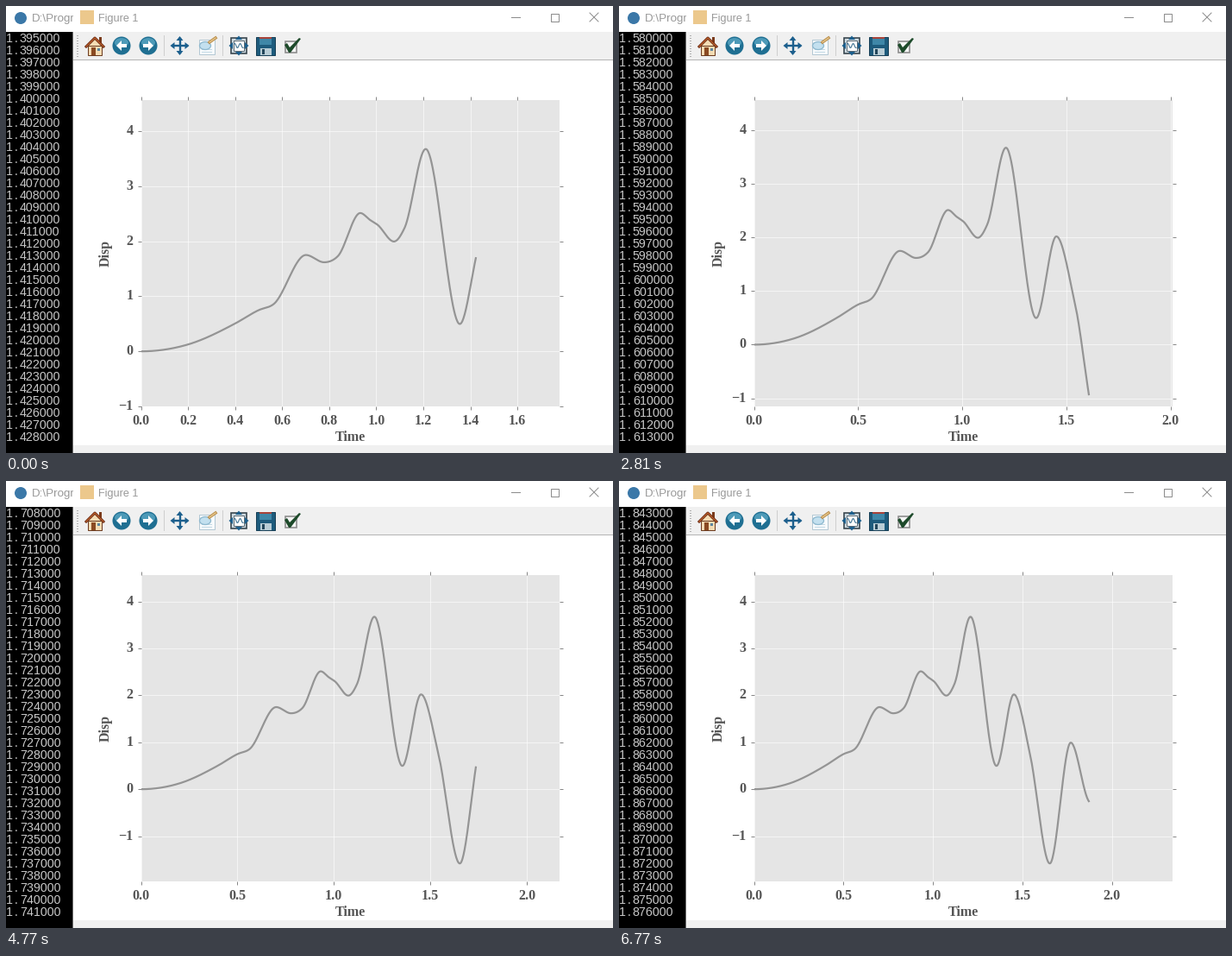
A matplotlib script that plays this animation: 704 by 518 pixels, repeating every 6.85 s.

```python
import numpy as np
import matplotlib.pyplot as plt
from matplotlib.animation import FuncAnimation
from matplotlib.patches import Circle, Ellipse, Polygon, Rectangle
from matplotlib.ticker import MaxNLocator

W, H, DPI = 704, 518, 72          # at 72 dpi one point is one pixel
FRAMES, INTERVAL = 137, 50
STEP_MS, LAST_STEP = 69.8, 97     # the simulated program redraws every ~70 ms
ROWS, ROW_H = 34, 14
MARGIN = 1.242                    # y limits relative to the curve's extremes

plt.rcParams.update({
    "font.family": "Liberation Serif", "font.weight": "bold", "font.size": 16,
    "ytick.alignment": "center",
})

# Peaks, valleys and bends of the displacement curve
KEYS = np.array([
    (0, 0), (.2, .125), (.4, .505), (.5, .748), (.563, .855), (.701, 1.75),
    (.778, 1.618), (.837, 1.73), (.932, 2.512), (.974, 2.385), (1.005, 2.3),
    (1.075, 1.995), (1.12, 2.24), (1.21, 3.675), (1.355, .497), (1.452, 2.02),
    (1.542, .755), (1.653, -1.582), (1.77, .993), (1.88, -.28),
])


def smooth_curve(keys):
    """Cubic Hermite curve that is level at each end, peak and valley."""
    x, y = keys.T
    d = np.diff(y, prepend=y[0], append=y[-1])
    m = np.where(d[:-1] * d[1:] > 0, np.gradient(y, x), 0)

    def f(t):
        i = np.clip(np.searchsorted(x, t) - 1, 0, len(x) - 2)
        h = x[i + 1] - x[i]
        u = (t - x[i]) / h
        s = u * u * (3 - 2 * u)
        return (y[i] * (1 - s) + y[i + 1] * s
                + h * u * (1 - u) * (m[i] * (1 - u) - m[i + 1] * u))
    return f


disp = smooth_curve(KEYS)
fig = plt.figure(figsize=(W / DPI, H / DPI), dpi=DPI, facecolor="white")


def layer():
    ax = fig.add_axes([0, 0, 1, 1])
    ax.set(xlim=(0, W), ylim=(H, 0))
    ax.axis("off")
    return ax


def rect(ax, x0, y0, x1, y1, color, **kw):
    ax.add_patch(Rectangle((x0, y0), x1 - x0, y1 - y0, fc=color,
                           **{"lw": 0, **kw}))


def poly(ax, pts, color):
    ax.add_patch(Polygon(pts, closed=True, fc=color, lw=0))


def stroke(ax, xs, ys, color, lw=1):
    ax.plot(xs, ys, color=color, lw=lw)


def label(ax, x, y, text, size, color, **kw):
    opts = {"family": "Liberation Sans", "weight": "normal",
            "va": "baseline", **kw}
    return ax.text(x, y, text, size=size, color=color, **opts)


# Console behind the figure window
con = layer()
rect(con, 0, 0, 78, 30, "white")
rect(con, 0, 30, 77, H, "black")
rect(con, 77, 30, 78, H, "#6e6e6e")
con.add_patch(Circle((17, 14), 7, fc="#3b78a8", lw=0))
label(con, 30, 18, r"D:\Progr", 13.4, "#999999")

rows = [[label(con, x, 42 + r * ROW_H, "", 14.2, "#c8c8c8")
         for x in (0, 9.5, 15.8)] for r in range(ROWS)]

# Figure window
win = layer()
rect(win, 78, 0, W, H, "white")
rect(win, 78, 30, W, 62, "#f0f0f0")
rect(win, 78, 62, W, 63, "#b4b4b4")
rect(win, 78, 509, W, H, "#f0f0f0")
rect(win, 86, 5, 102, 21, "#ecc88c")
label(win, 107, 18, "Figure 1", 12.6, "#999999")

GRAY = "#8c8c8c"
rect(win, 586, 13, 597, 14, GRAY)
rect(win, 631.5, 8.5, 640.5, 17.5, "none", ec=GRAY, lw=1)
stroke(win, [677, 687], [8, 18], GRAY)
stroke(win, [677, 687], [18, 8], GRAY)

for y in range(34, 61, 3):
    rect(win, 82, y, 84, y + 1, "#b0b0b0")
for x in (183, 251):
    rect(win, x, 34, x + 1, 58, "#cfcfcf")

NAVY = "#1c5f8d"


def arrow_heads(x, y, base, tip):
    for dx, dy in ((1, 0), (-1, 0), (0, 1), (0, -1)):
        bx, by = x + base * dx, y + base * dy
        poly(win, [(x + tip * dx, y + tip * dy), (bx + 4 * dy, by + 4 * dx),
                   (bx - 4 * dy, by - 4 * dx)], NAVY)


def home(x, y):
    rect(win, x + 5, y - 10, x + 8, y - 3, "#7a3b1c")
    rect(win, x - 8, y, x + 8, y + 11, "#f3dcb4", ec="#6b3a1e", lw=1)
    poly(win, [(x, y - 9), (x - 8, y), (x + 8, y)], "#f3dcb4")
    rect(win, x - 4, y + 2, x + 1, y + 11, "#8a4a22")
    rect(win, x + 3, y + 3, x + 6, y + 6, "#5c86a0")
    roof = [x - 10, x, x + 10], [y + 1, y - 9, y + 1]
    stroke(win, *roof, "#6e2d14", 3)
    stroke(win, *roof, "#c8662e", 1)


def arrow_button(x, y, d):
    win.add_patch(Circle((x, y), 10.5, fc="#1f6f92", lw=0))
    win.add_patch(Ellipse((x, y - 3.5), 16, 11, fc="#4d9ab8", lw=0))
    pts = [(6, 0), (0, -6), (0, -2), (-6, -2), (-6, 2), (0, 2), (0, 6)]
    poly(win, [(x + d * a, y + b) for a, b in pts], "white")


def pan(x, y):
    stroke(win, [x - 8, x + 8], [y, y], NAVY, 2.4)
    stroke(win, [x, x], [y - 8, y + 8], NAVY, 2.4)
    arrow_heads(x, y, 6, 11)


def zoom(x, y):
    rect(win, x - 9, y - 7, x + 9, y + 10, "#f7fafc", ec="#b4c8d4", lw=1)
    for dy in (4, 7):
        rect(win, x - 6, y + dy, x + 6, y + dy + 1, "#c2d8e4")
    win.add_patch(Ellipse((x - 2, y), 13, 9, fc="#c3e0ef", ec="#8fb9cf", lw=1.3))
    handle = [x + 3, x + 10], [y - 4, y - 9]
    stroke(win, *handle, "#b98d4c", 3.4)
    stroke(win, *handle, "#e6c68a", 1.4)


def subplots(x, y):
    rect(win, x - 9, y - 9, x + 9, y + 9, "#cfdbe2", ec="#36434c", lw=1.6)
    rect(win, x - 6, y - 6, x + 6, y + 6, "white", ec="#5b6a74", lw=1)
    xs = np.linspace(-5, 5, 20)
    stroke(win, x + xs, y - 2.5 * np.sin(xs), "#4f7f9c", 1.2)
    arrow_heads(x, y, 7, 11.5)


def save(x, y):
    rect(win, x - 11, y - 10.5, x + 11, y + 11, "#1e5b7c", ec="#173f56", lw=1)
    rect(win, x - 7, y - 10, x + 7, y - 1, "#3f87a8")
    rect(win, x - 7, y - 10, x + 7, y - 8, "#a8433a")
    rect(win, x - 6, y + 3, x + 7, y + 11, "#b9cdd6")
    rect(win, x - 4, y + 4, x - 1, y + 10, "#23465a")


def check(x, y):
    rect(win, x - 7, y - 5, x + 6, y + 8, "#f6f6f6", ec="#8a8a8a", lw=1.6)
    poly(win, [(x - 8, y - 1), (x - 5, y - 3), (x - 2, y + 2), (x + 9, y - 9),
               (x + 11, y - 8), (x - 1, y + 8), (x - 3, y + 8)], "#1d4a2a")


home(103, 46)
arrow_button(134, 46, -1)
arrow_button(165, 46, 1)
pan(201.5, 46)
zoom(233, 46)
subplots(270, 46)
save(301, 46)
check(331, 46)

# Plot
TEXT = "#555555"
L, R, T, B = 156.5, 642, 109, 464
ax = fig.add_axes([L / W, 1 - B / H, (R - L) / W, (B - T) / H],
                  facecolor="#e5e5e5")
ax.spines[:].set_visible(False)
ax.set_axisbelow(True)
ax.grid(color="white", lw=.6, ls="-")
ax.tick_params(direction="out", length=4, width=.7, pad=5, color=TEXT,
               labelcolor=TEXT, top=True, right=True)
for axis in (ax.xaxis, ax.yaxis):
    axis.set_major_locator(MaxNLocator(9, steps=[1, 2, 5, 10]))
curve, = ax.plot([], [], color="#949494", lw=2.2)

serif = {"family": "Liberation Serif", "weight": "bold", "ha": "center"}
label(win, 399, 504.5, "Time", 16, TEXT, **serif)
label(win, 120, 287, "Disp", 16, TEXT, rotation=90, rotation_mode="anchor",
      **serif)


def printed_ms(step):
    """Simulated milliseconds printed so far; the run dips slightly midway."""
    return int(round(np.interp(step, [0, 40, 57, LAST_STEP],
                               [1428, 1613, 1690, 1876])))


def update(k):
    # each picture shows the redraw current at the end of its interval
    step = min(int(((k + 1) * INTERVAL - 1) / STEP_MS), LAST_STEP)
    n = printed_ms(step)

    for ms, cells in zip(range(n - ROWS + 1, n + 1), rows):
        whole, decimals = f"{ms / 1000:.6f}".split(".")
        for cell, text in zip(cells, (whole, ".", decimals)):
            cell.set_text(text)

    now = (n - 5) / 1000          # the plot lags the console a little
    t = np.linspace(0, now, 600)
    v = disp(t)
    curve.set_data(t, v)
    ax.set_xlim(0, 1.25 * now)
    ax.set_ylim(min(-1, MARGIN * v.min()), MARGIN * v.max())
    return [curve]


anim = FuncAnimation(fig, update, frames=FRAMES, interval=INTERVAL,
                     repeat=True, repeat_delay=0)
plt.show()
```
